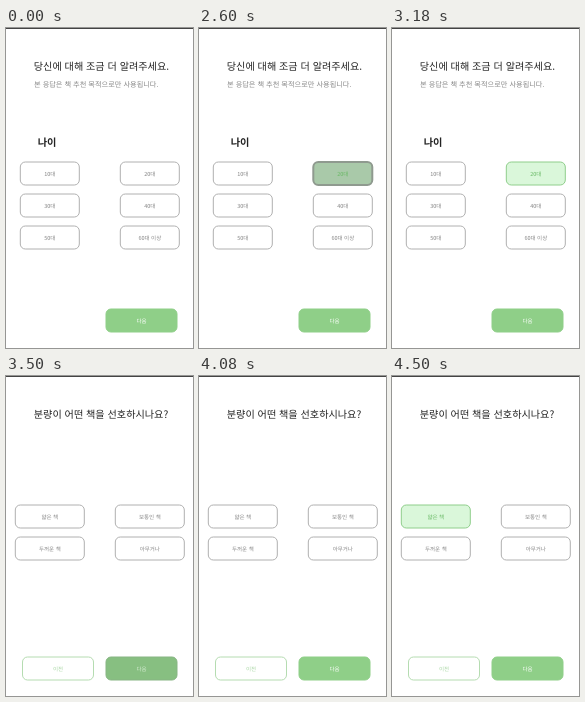
Animation of 187 by 320 pixels, one loop 5000 ms. Source, as an HTML page:

```html
<!DOCTYPE html>
<html lang="ko">
<head>
<meta charset="utf-8">
<style>
html, body { margin: 0; width: 100%; height: 100%; overflow: hidden; background: #fff; }
svg { display: block; width: 100vw; height: 100vh; }
text {
  font-family: "Noto Sans CJK KR", "Noto Sans CJK", sans-serif;
  font-size: 5.5px; fill: #858585; text-rendering: geometricPrecision;
}
.title { font-size: 10.13px; fill: #222; }
.note { font-size: 7.2px; fill: #888; }
.label { font-size: 10.2px; font-weight: 700; fill: #222; }
.button text { text-anchor: middle; }
.button rect { fill: #fff; stroke: #b0b0b0; }
.pressed rect { fill: #a9c9a9; stroke: #8f9a8f; stroke-width: 2; }
.pressed text, .chosen text { fill: #69b965; }
.chosen rect { fill: #daf7da; stroke: #8fce8b; }
.back rect { stroke: #b5dcb1; }
.back text { fill: #a5d5a0; }
.next rect { fill: #8fcf88; stroke: #8fcf88; }
.next text { fill: #fff; }
.next.pressed rect { fill: #87bf81; stroke: #87b583; stroke-width: 1; }
.next.pressed text { fill: #d5ecd2; }
</style>
</head>
<body>
<svg viewBox="0 0 187 320" preserveAspectRatio="none">
  <rect width="187" height="1" fill="#444"/>
  <g id="age">
    <text class="title" x="27.8" y="41.5">당신에 대해 조금 더 알려주세요.</text>
    <text class="note" x="28" y="59.2">본 응답은 책 추천 목적으로만 사용됩니다.</text>
    <text class="label" x="31.7" y="118.4">나이</text>
  </g>
  <g id="length">
    <text class="title" x="27.8" y="41.5">분량이 어떤 책을 선호하시나요?</text>
  </g>
</svg>
<script>
const LOOP = 5000;
const age = document.getElementById('age');
const size = document.getElementById('length');

// The 1 px outline lies inside the given box.
function button(page, label, x, y, width, kind = '') {
  const g = document.createElementNS('http://www.w3.org/2000/svg', 'g');
  g.innerHTML = `<rect x="${x + .5}" y="${y + .5}" width="${width - 1}" height="23" rx="5"/>
    <text x="${x + width / 2}" y="${y + 14}">${label}</text>`;
  page.append(g);
  return state => g.setAttribute('class', `button ${kind} ${state}`);
}

// Two columns, 100 px apart; rows 32 px apart.
function options(page, labels, x, y, width) {
  return labels.map((label, i) => {
    const set = button(page, label, x + i % 2 * 100, y + (i >> 1) * 32, width);
    set('');
    return set;
  });
}

const ages = options(age, ['10대', '20대', '30대', '40대', '50대', '60대 이상'], 13.8, 133.5, 60);
const sizes = options(size, ['얇은 책', '보통인 책', '두꺼운 책', '아무거나'], 8.8, 128.5, 70);
button(age, '다음', 99.5, 280.5, 72, 'next')('');
button(size, '이전', 16, 280.5, 72, 'back')('');
const next = button(size, '다음', 99.5, 280.5, 72, 'next');

const press = (t, start) => t < start ? '' : t < start + 100 ? 'pressed' : 'chosen';

function draw() {
  const t = performance.now() % LOOP;
  age.style.display = t < 3500 ? '' : 'none';
  size.style.display = t < 3500 ? 'none' : '';
  ages[1](press(t, 2600));
  next(t < 3600 ? 'pressed' : '');
  sizes[0](press(t, 4400));
  requestAnimationFrame(draw);
}
draw();
</script>
</body>
</html>
```
